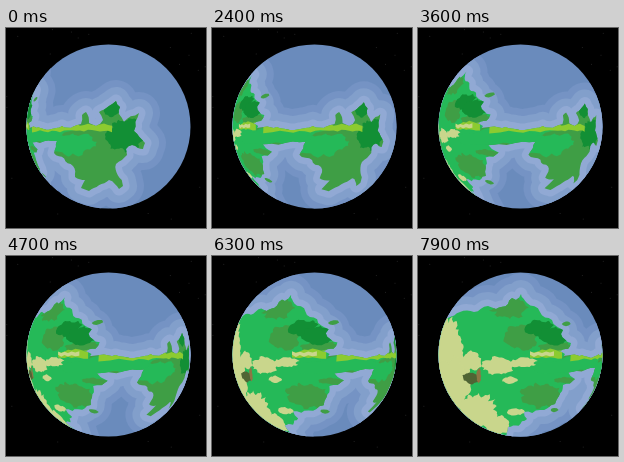
An HTML page with a canvas for the animation above (8000 ms loop, 200 px wide and 200 px high).

```html
<!DOCTYPE html>
<html lang="en">
<head>
<meta charset="utf-8">
<title>Turning planet</title>
<style>
html, body { margin: 0; width: 100%; height: 100%; overflow: hidden; background: #000; }
canvas { display: block; width: 100vw; height: 100vh; }
</style>
</head>
<body>
<canvas id="c"></canvas>
<script>
const LOOP = 8000, STEP = 100, TURN = 10; // ms, ms, degrees per second
const CX = 102.5, CY = 98.5, R = 82, DIST = 3;
const FOCAL = R * Math.sqrt(DIST * DIST - 1), RIM = 1 / DIST;
const EAST = 0, WEST = 79; // turn angles at which shapes are plotted

const DEEP = '#6a8bbc';
const SHELVES = [[42, '#7593c4'], [28, '#829fcb'], [13, '#91a9d4']]; // width, colour
const BRIGHT = '#25b958', MID = '#3f9e45', DARK = '#128f35';
const LIME = '#8ccb30', SAND = '#c9d68c', OLIVE = '#4f6434', BROWN = '#8c7544';

const canvas = document.getElementById('c');
const ctx = canvas.getContext('2d');

let seed = 7;
function rand() {
  seed = (seed * 16807) % 2147483647;
  return seed / 2147483647;
}
const jitter = size => (rand() * 2 - 1) * size;

function spin([x, y, z], deg) {
  const a = deg * Math.PI / 180, s = Math.sin(a), c = Math.cos(a);
  return [x * c + z * s, y, z * c - x * s];
}

// Perspective view; points behind the rim slide outwards past it.
function project([x, y, z]) {
  const k = z >= RIM ? FOCAL / (DIST - z) : R * (1 + RIM - z) / Math.hypot(x, y);
  return [CX + x * k, CY + y * k];
}

function unproject([px, py]) {
  const dx = px - CX, dy = py - CY, dist = Math.hypot(dx, dy) || 1e-6;
  const r = Math.min(dist, R * 1.08);
  let z = RIM + 1 - r / R, flat = Math.sqrt(1 - z * z);
  if (r < R) {
    const m = r / FOCAL, q = 1 + m * m;
    z = (m * m * DIST + Math.sqrt(q - m * m * DIST * DIST)) / q;
    flat = m * (DIST - z);
  }
  return [dx * flat / dist, dy * flat / dist, z];
}

// Splits long edges and pushes the middle sideways, for a ragged coast.
function roughen(pts, amount, minLen) {
  return pts.flatMap((a, i) => {
    const b = pts[(i + 1) % pts.length];
    const dx = b[0] - a[0], dy = b[1] - a[1];
    if (Math.hypot(dx, dy) < minLen) return [a];
    const k = jitter(amount);
    return [a, [(a[0] + b[0]) / 2 - dy * k, (a[1] + b[1]) / 2 + dx * k]];
  });
}

const onGlobe = (view, pts) => pts.map(p => spin(unproject(p), -view));

function coast(view, flat) {
  let pts = [];
  for (let i = 0; i < flat.length; i += 2) pts.push([flat[i], flat[i + 1]]);
  for (const minLen of [12, 7, 5]) pts = roughen(pts, .14, minLen);
  return onGlobe(view, pts);
}

function blob(view, x, y, rx, ry) {
  const pts = [], n = Math.max(8, Math.round(rx + ry));
  for (let i = 0; i < n; i++) {
    const a = i / n * Math.PI * 2, k = 1 + jitter(.2);
    pts.push([x + rx * k * Math.cos(a), y + ry * k * Math.sin(a)]);
  }
  return onGlobe(view, roughen(pts, .2, 3));
}

function ridge(view, x0, x1, y, half) {
  const top = [], bottom = [];
  for (let x = x0; x <= x1; x += 4) {
    const mid = y + jitter(1.3), t = half * (.7 + rand() * .6);
    top.push([x, mid - t]);
    bottom.unshift([x, mid + t]);
  }
  return onGlobe(view, [...top, ...bottom]);
}

const east = coast(EAST, [20,100, 35,101, 50,102, 56,98, 64,101, 75,96, 76,87, 80,84, 83,95, 90,98,
  97,92, 93,84, 103,78, 110,73, 114,79, 113,86, 118,94, 133,85, 128,103, 139,115, 137,121, 126,117,
  120,121, 121,127, 110,136, 117,158, 113,161, 103,152, 83,163, 75,160, 79,152, 69,149, 67,138,
  48,125, 51,113, 34,115, 20,112]);

const west = coast(WEST, [10,62, 30,62, 42,56, 56,56, 70,50, 78,53, 90,48, 94,42, 98,44, 103,38,
  109,47, 122,56, 134,64, 145,74, 143,78, 153,87, 150,93, 140,95, 147,98, 144,103, 153,100, 158,103,
  164,99, 184,100, 179,108, 165,112, 147,108, 141,110, 157,123, 145,129, 141,140, 137,148, 122,154,
  106,156, 109,163, 90,171, 88,185, 60,185, 20,150, 5,105]);

const islands = [blob(WEST, 136, 154, 4, 2.5), blob(WEST, 148, 68, 4, 2.5)];

const patches = [
  [BRIGHT, blob(EAST, 65, 116, 23, 11)],
  [BRIGHT, blob(EAST, 36, 108, 18, 6)],
  [DARK, blob(EAST, 120, 107, 19, 16)],
  [DARK, blob(EAST, 107, 80, 9, 9)],
  [MID, blob(WEST, 92, 52, 18, 10)],
  [MID, blob(WEST, 103, 81, 17, 12)],
  [MID, blob(WEST, 138, 91, 16, 5)],
  [DARK, blob(WEST, 121, 72, 13, 8)],
  [DARK, blob(WEST, 138, 80, 15, 9)],
  [MID, blob(WEST, 123, 140, 19, 12)],
  [MID, blob(WEST, 146, 124, 12, 3)],
  [SAND, blob(WEST, 27, 91, 18, 30)],
  [SAND, blob(WEST, 36, 127, 19, 24)],
  [SAND, blob(WEST, 59, 156, 20, 18)],
  [SAND, blob(WEST, 79, 170, 11, 10)],
  [SAND, blob(WEST, 53, 105, 11, 9)],
  [SAND, blob(WEST, 79, 110, 16, 8)],
  [SAND, blob(WEST, 104, 107, 14, 5)],
  [SAND, blob(WEST, 92, 124, 7, 3.5)],
  [SAND, blob(WEST, 97, 156, 9, 3.5)],
  [OLIVE, blob(WEST, 53, 122, 8, 6)],
  [BROWN, blob(WEST, 61, 120, 2.5, 7)],
  [LIME, ridge(EAST, 26, 108, 100, 3)],
  [LIME, ridge(WEST, 112, 146, 98, 3.5)],
  [SAND, ridge(WEST, 112, 136, 98, 1.8)]
];

const stars = Array.from({ length: 40 }, () => [rand() * 200, rand() * 200]);

function outline(rings, turn) {
  const path = new Path2D();
  for (const ring of rings) {
    ring.forEach((v, i) => {
      const p = project(spin(v, turn));
      i ? path.lineTo(...p) : path.moveTo(...p);
    });
    path.closePath();
  }
  return path;
}

function fill(path, color) {
  ctx.fillStyle = color;
  ctx.fill(path);
}

function drawPlanet(turn) {
  const land = outline([east, west], turn), isles = outline(islands, turn);
  ctx.save();
  ctx.beginPath();
  ctx.arc(CX, CY, R, 0, Math.PI * 2);
  ctx.clip();
  ctx.fillStyle = DEEP;
  ctx.fillRect(0, 0, 200, 200);

  ctx.lineJoin = 'round';
  for (const [width, color] of SHELVES) {
    ctx.lineWidth = width;
    ctx.strokeStyle = color;
    fill(land, color);
    ctx.stroke(land);
  }
  fill(isles, MID);
  fill(outline([east], turn), MID);
  fill(outline([west], turn), BRIGHT);
  ctx.clip(land);
  for (const [color, ring] of patches) fill(outline([ring], turn), color);
  ctx.restore();
}

function draw(ms) {
  const turn = Math.floor(ms % LOOP / STEP) * STEP / 1000 * TURN;
  const dpr = devicePixelRatio || 1;
  const w = Math.round(innerWidth * dpr), h = Math.round(innerHeight * dpr);
  if (canvas.width !== w || canvas.height !== h) {
    canvas.width = w;
    canvas.height = h;
  }
  ctx.setTransform(w / 200, 0, 0, h / 200, 0, 0);
  ctx.fillStyle = '#000';
  ctx.fillRect(0, 0, 200, 200);
  ctx.fillStyle = '#202020';
  for (const [x, y] of stars) ctx.fillRect(x, y, 1, 1);
  drawPlanet(turn);
}

const start = performance.now();
function tick() {
  draw(performance.now() - start);
  requestAnimationFrame(tick);
}
tick();
</script>
</body>
</html>
```
